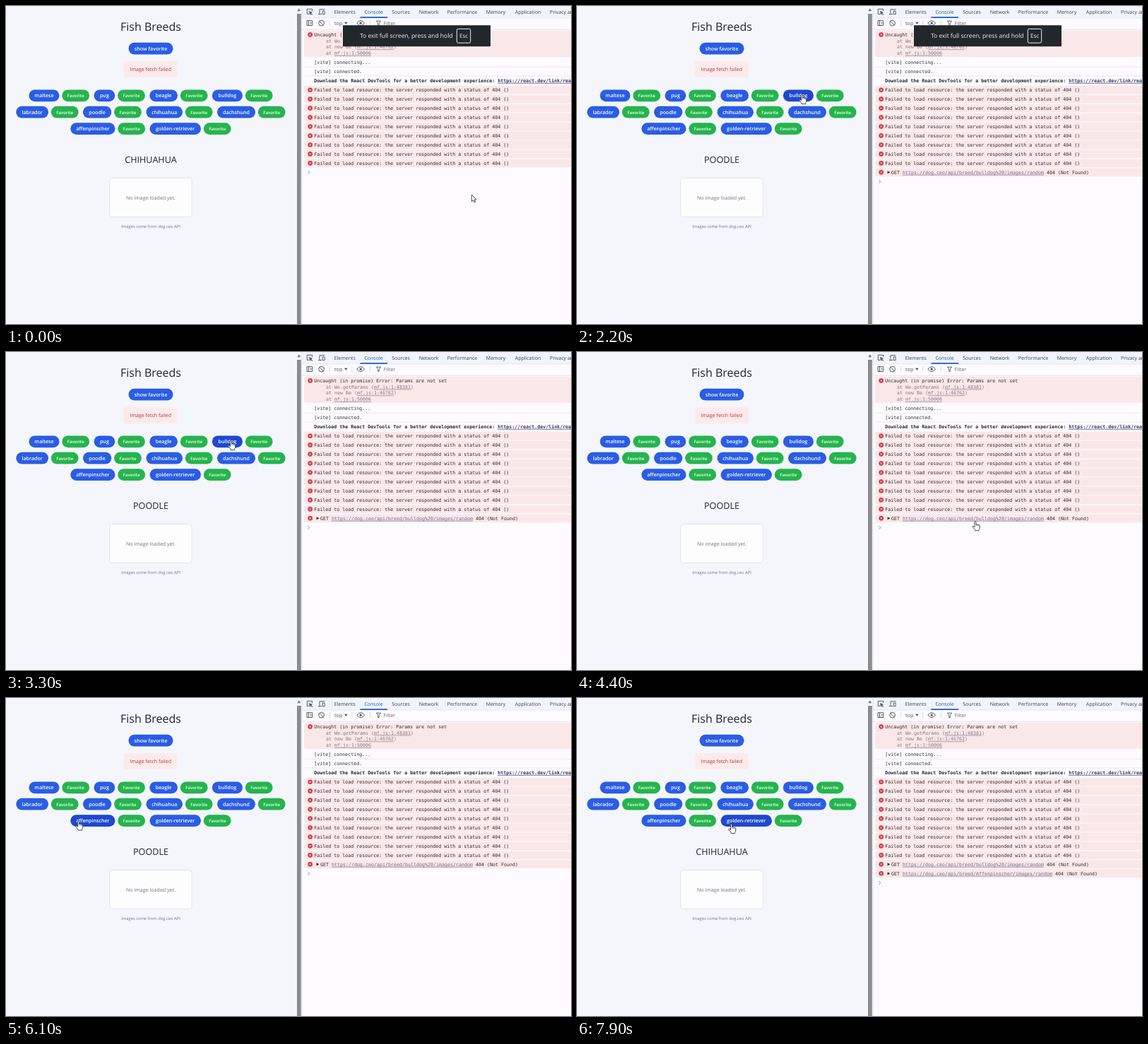
An HTML page for the animation above (8000 ms loop, 800 by 450 pixels).

```html
<!DOCTYPE html>
<html lang="en">
<head>
<meta charset="utf-8">
<title>Fish Breeds</title>
<style>
  html, body { margin: 0; width: 100%; height: 100%; overflow: hidden; background: #f4f6fb; }
  svg { display: block; width: 800px; height: 450px; text-rendering: geometricPrecision; }
  text { font-family: "Open Sans", "Noto Sans", sans-serif; white-space: pre; }
  .mono { font-family: "DejaVu Sans Mono", "Noto Sans Mono", monospace; font-size: 6.65px; }
  .link { text-decoration: underline; }
</style>
</head>
<body>
<svg id="stage" viewBox="0 0 800 450"></svg>
<script>
const LOOP = 8000;
const stage = document.getElementById('stage');
const BLUE = '#2a5de5', BLUE_HOVER = '#1e49cf', GREEN = '#25b44d', GREEN_HOVER = '#199b40';
const PINK = '#fae8e9', INK = '#35282c', MUTED = '#8b7678', ICON = '#565a61';

function add(tag, attrs, parent = stage) {
  const node = document.createElementNS('http://www.w3.org/2000/svg', tag);
  for (const key in attrs) node.setAttribute(key, attrs[key]);
  return parent.appendChild(node);
}
const box = (x, y, width, height, fill, rx = 0, more = {}, parent = stage) =>
  add('rect', { x, y, width, height, fill, rx, ...more }, parent);
const stroke = (d, color = ICON, width = 1, parent = stage) =>
  add('path', { d, fill: 'none', stroke: color, 'stroke-width': width }, parent);
function label(x, y, content, size, fill, more = {}, parent = stage) {
  const node = add('text', { x, y, 'font-size': size, fill, ...more }, parent);
  node.textContent = content;
  return node;
}
const centered = (x, y, content, size, fill, weight = 400, parent = stage) =>
  label(x, y, content, size, fill, { 'text-anchor': 'middle', 'font-weight': weight }, parent);

// Console line made of [text, color, isLink] parts
function consoleLine(x, y, parts, parent = stage, weight = 400) {
  const line = add('text', { x, y, class: 'mono', 'font-weight': weight }, parent);
  for (const [content, fill, isLink] of parts) {
    add('tspan', { fill, class: isLink ? 'link' : '' }, line).textContent = content;
  }
}

// Web page
const targets = [];
function button(x1, x2, cy, content, size, color, hover) {
  const rect = box(x1, cy - 8.4, x2 - x1, 16.8, color, 8.4);
  centered((x1 + x2) / 2, cy + 2.4, content, size, '#fff', 600);
  targets.push({ x1, x2, y1: cy - 8.4, y2: cy + 8.4, rect, color, hover });
}

box(0, 0, 412, 450, '#f4f6fb');
centered(205, 35.4, 'Fish Breeds', 16, '#1e2430', 500);
button(173.5, 236.5, 60.2, 'show favorite', 7.1, BLUE, BLUE_HOVER);
box(166.5, 78, 76.5, 23.2, '#fdebec', 3);
centered(204.8, 92.2, 'Image fetch failed', 7.05, '#b3343e');

const breeds = [
  [126.8, [['maltese', 32.5, 75.5], ['pug', 124.5, 154.3], ['beagle', 203.3, 243], ['bulldog', 291.8, 335]]],
  [150.2, [['labrador', 14.3, 60], ['poodle', 109, 149.3], ['chihuahua', 198.5, 250], ['dachshund', 299, 353]]],
  [173.6, [['affenpinscher', 91.3, 154.5], ['golden-retriever', 203.5, 276]]]
];
for (const [cy, row] of breeds) {
  for (const [name, x1, x2] of row) {
    button(x1, x2, cy, name, 7.1, BLUE, BLUE_HOVER);
    button(x2 + 3.8, x2 + 42.6, cy, 'Favorite', 6.1, GREEN, GREEN_HOVER);
  }
}
const heading = centered(205, 222.1, '', 12.6, '#1e2430', 500);
box(146.7, 243.7, 116.6, 54.8, '#fdfdfe', 4, { stroke: '#dfe2ea', 'stroke-width': .9 });
centered(205, 273.5, 'No image loaded yet.', 7.1, '#70767f');
centered(205, 313.7, 'Images come from dog.ceo API', 5.8, '#70767f');

box(411.5, 0, 7, 450, '#f7f8fb');
box(412, 11, 5.8, 439, '#8b8c8f');
add('path', { d: 'M412.3 7.3L414.8 3.2L417.3 7.3Z', fill: '#77787c' });

// Developer tools
box(418.5, 0, 382, 450, '#fdfbff');
box(418.5, 0, 382, 17, '#f1f4fc');
stroke('M418.5 17H800M418.5 33.3H800', '#dce1ee', .8);
stroke('M419 0V450', '#d9dde8', .8);
stroke('M429 11.5H426.3V4.3H433.5V7', ICON, 1);
add('path', { d: 'M429 7L434.2 9L432.2 10L434.2 12.2L433.2 13.1L431.2 11L430.2 13Z', fill: ICON });
stroke('M444 10.8V4.8H451.5M442 11.5H447M448.2 7H451.2V11.7H448.2Z');

const tabs = [['Elements', 479.7], ['Console', 520.5], ['Sources', 559], ['Network', 598.6],
  ['Performance', 646], ['Memory', 693.5], ['Application', 739]];
for (const [name, x] of tabs) centered(x, 11.4, name, 7, name === 'Console' ? '#1d55b8' : '#3d4046');
label(770, 11.4, 'Privacy and security', 7, '#3d4046');
box(501.3, 15.3, 39, 1.7, '#1d5fce', .8);

stroke('M426 20.7H433.7V27.5H426ZM428.4 20.7V27.5M430.5 22.5L432.2 24.1L430.5 25.7');
add('circle', { cx: 446.6, cy: 24.2, r: 3.9, fill: 'none', stroke: ICON });
stroke('M443.9 21.5L449.3 26.9');
stroke('M458.6 20V28.5M489.7 20V28.5M515.5 20V28.5', '#cfd4e0', .8);
label(465, 26.6, 'top', 7.2, '#505359');
add('path', { d: 'M479 22.8H483.7L481.35 26Z', fill: ICON });
stroke('M496.8 24.2Q502.2 17.3 507.6 24.2Q502.2 31.1 496.8 24.2Z');
add('circle', { cx: 502.2, cy: 24.2, r: 1.6, fill: ICON });
stroke('M524.4 21.2H530.6L528.3 24.3V27.5H526.7V24.3Z', ICON, .9);
label(534.8, 26.7, 'Filter', 7, '#62656c');

function errorRow(cy, height = 11.9, top = cy - 5.95, parent = stage) {
  box(422, top, 384, height, PINK, 3, {}, parent);
  add('circle', { cx: 430.7, cy, r: 3.3, fill: '#d8323a' }, parent);
  stroke(`M429.4 ${cy - 1.3}l2.6 2.6m0 -2.6l-2.6 2.6`, '#fff', .8, parent);
}
errorRow(40.6, 37.4, 34.7);
consoleLine(436.3, 43, [['Uncaught (in promise) Error: Params are not set', INK]]);
[['at We.getParams (', 'mf.js:1:48381', ')'], ['at new Be (', 'mf.js:1:46762', ')'], ['at ', 'mf.js:1:50006', '']]
  .forEach(([before, link, after], i) => consoleLine(453, 51.7 + i * 8.75,
    [[before, MUTED], [link, '#8a7486', true], [after, MUTED]]));
stroke('M422 86.4H800M422 99H800', '#e6e6ef', .8);
consoleLine(436.3, 82.2, [['[vite] connecting...', '#303238']]);
consoleLine(436.3, 95.2, [['[vite] connected.', '#303238']]);
consoleLine(436.3, 107.9, [
  ['Download the React DevTools for a better development experience: ', '#282a30'],
  ['https://react.dev/link/react-devtools', '#363766', true]], stage, 700);

const rowY = i => 118.7 + i * 12.96;
for (let i = 0; i < 9; i++) {
  errorRow(rowY(i));
  consoleLine(436.3, rowY(i) + 2.4,
    [['Failed to load resource: the server responded with a status of 404 ()', INK]]);
}

function requestRow(i, breed) {
  const group = add('g', {});
  const y = rowY(i);
  errorRow(y, 11.9, y - 5.95, group);
  add('path', { d: `M439.6 ${y - 2.1}L443.4 ${y}L439.6 ${y + 2.1}Z`, fill: INK }, group);
  consoleLine(445, y + 2.4, [['GET ', INK],
    [`https://dog.ceo/api/breed/${breed}/images/random`, '#75698c', true],
    [' 404 (Not Found)', INK]], group);
  return group;
}
const requests = [
  { shownAt: 1900, group: requestRow(9, 'bulldog%20') },
  { shownAt: 6700, group: requestRow(10, 'Affenpinscher') }
];
targets.push({ x1: 461, x2: 661, y1: 230, y2: 241 });
const prompt = stroke('M427.4 -2.3L430 0L427.4 2.3', '#6489c8', .9);

// Full screen notice
const notice = add('g', {});
box(477, 27.3, 209, 30, '#22272c', 1, {}, notice);
label(501, 45.3, 'To exit full screen, press and hold', 8.5, '#f5f5f6', {}, notice);
box(638.3, 32.4, 19.4, 19.8, 'none', 2, { stroke: '#eef0f1', 'stroke-width': 1 }, notice);
centered(648, 45.2, 'Esc', 8, '#f5f5f6', 400, notice);

// Pointers, drawn with the hot spot at the origin
const cursor = add('g', {});
const outline = { fill: '#fff', stroke: '#24262b', 'stroke-width': .8, 'stroke-linejoin': 'round' };
const arrow = add('path', { d: 'M0 0V9.6L2.2 7.6L3.7 11L5.3 10.3L3.8 7.1H6.7Z', ...outline }, cursor);
const hand = add('g', {}, cursor);
add('path', { d: 'M-1 1Q0 -.6 1 1V4.8Q2 4 2.8 5.2Q3.8 4.4 4.6 5.6Q6 5 6.2 6.6V9.8Q6 11.4 5 12.2V13.6H-.4V12.4L-3.6 8.6Q-4.2 7.1 -2.7 7.2L-1 8.6Z', ...outline }, hand);
stroke('M1 4.8V7M2.8 5.2V7.2M4.6 5.6V7.4', '#24262b', .5, hand);

// Pointer stops: [arrive, leave, x, y]
const stops = [
  [0, 500, 659.3, 267], [1300, 3700, 318.5, 125], [4300, 4800, 564, 239.2],
  [5700, 7300, 102.5, 173.6], [7800, LOOP, 218.5, 178]
];
const clamp01 = v => Math.min(1, Math.max(0, v));
const ease = p => p * p * (3 - 2 * p);

function pointerAt(t) {
  const next = stops.findIndex(stop => t < stop[0]);
  if (next < 0) return stops[stops.length - 1].slice(2);
  const [, leave, x, y] = stops[next - 1];
  const [arrive, , toX, toY] = stops[next];
  const p = ease(clamp01((t - leave) / (arrive - leave)));
  return [x + (toX - x) * p, y + (toY - y) * p];
}

function render(t) {
  const [x, y] = pointerAt(t);
  let clickable = false;
  for (const { x1, x2, y1, y2, rect, color, hover } of targets) {
    const linkHidden = !rect && t < requests[0].shownAt;
    const inside = !linkHidden && x >= x1 && x <= x2 && y >= y1 && y <= y2;
    clickable = clickable || inside;
    if (rect) rect.setAttribute('fill', inside ? hover : color);
  }
  cursor.setAttribute('transform', `translate(${x} ${y})`);
  arrow.setAttribute('display', clickable ? 'none' : 'inline');
  hand.setAttribute('display', clickable ? 'inline' : 'none');

  let rows = 9;
  for (const { shownAt, group } of requests) {
    const shown = t >= shownAt;
    group.setAttribute('display', shown ? 'inline' : 'none');
    rows += shown;
  }
  prompt.setAttribute('transform', `translate(0 ${rowY(rows) + .2})`);
  heading.textContent = rows === 10 ? 'POODLE' : 'CHIHUAHUA';
  notice.setAttribute('opacity', 1 - clamp01((t - 2400) / 300));
}

const start = performance.now();
function tick() {
  render((performance.now() - start) % LOOP);
  requestAnimationFrame(tick);
}
tick();
</script>
</body>
</html>
```
